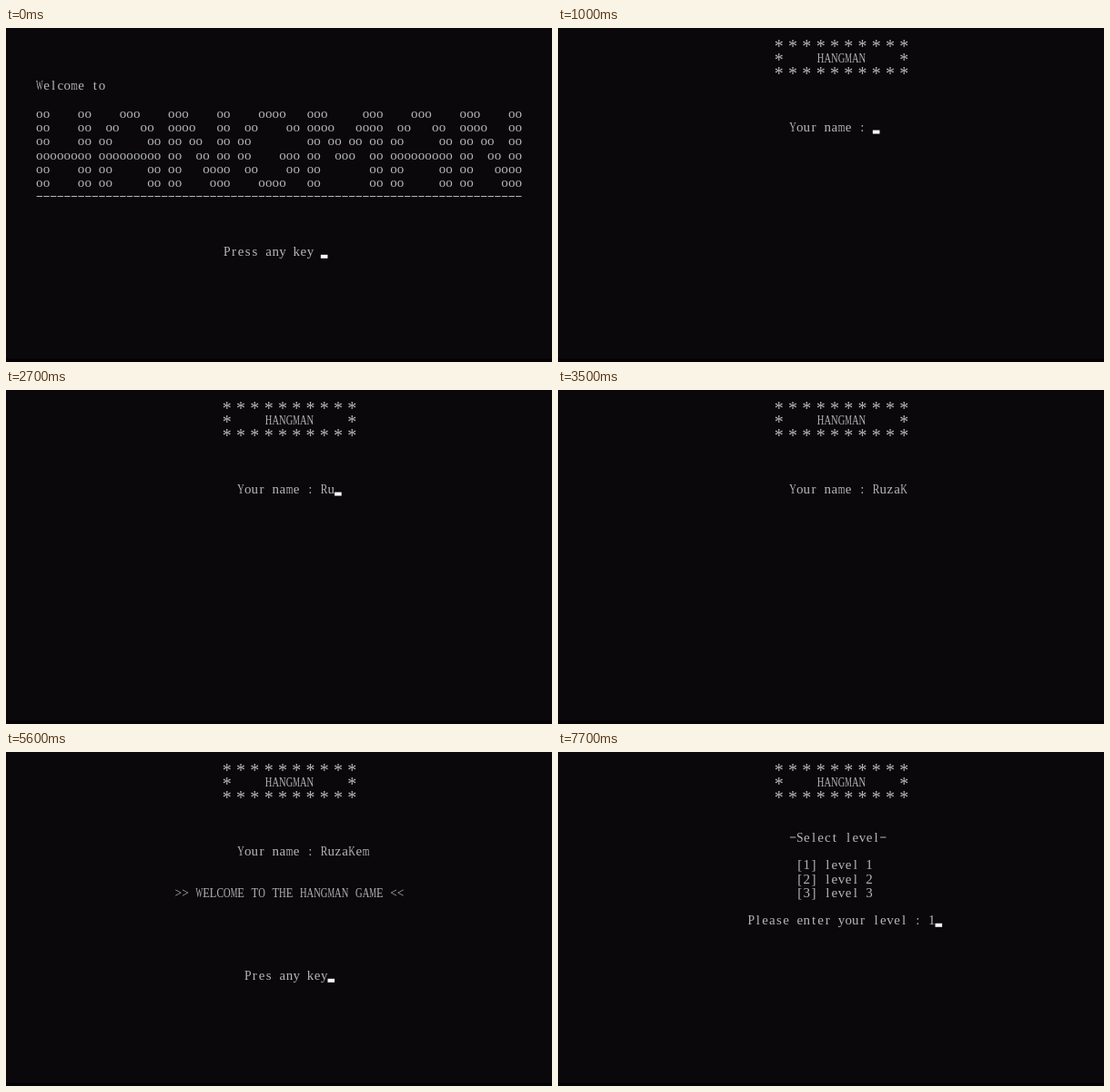
Recreate the animation shown at these times as an HTML page with a canvas. Size 600 px wide and 368 px high, loop 8000 ms.

```html
<!DOCTYPE html>
<html lang="en">
<head>
<meta charset="utf-8">
<title>Hangman in a console</title>
<style>
  html, body { margin: 0; width: 100%; height: 100%; overflow: hidden; background: #000; }
  canvas { display: block; }
</style>
</head>
<body>
<canvas id="stage" width="600" height="368"></canvas>
<script>
const ctx = document.getElementById('stage').getContext('2d');
const LOOP = 8000;
const CELL = 7.63, LINE = 15.25;
const LEFT = 2.5, TOP = 7.4;
const FAMILY = '"Liberation Serif", serif';
const NAME = 'RuzaKem';

const GLYPHS = {
  H: ['oo    oo', 'oo    oo', 'oo    oo', 'oooooooo', 'oo    oo', 'oo    oo'],
  A: ['   ooo   ', ' oo   oo ', 'oo     oo', 'ooooooooo', 'oo     oo', 'oo     oo'],
  N: ['ooo    oo', 'oooo   oo', 'oo oo  oo', 'oo  oo oo', 'oo   oooo', 'oo    ooo'],
  G: ['   oooo  ', ' oo    oo', 'oo       ', 'oo    ooo', ' oo    oo', '   oooo  '],
  M: ['ooo     ooo', 'oooo   oooo', 'oo oo oo oo', 'oo  ooo  oo', 'oo       oo', 'oo       oo']
};

// Every character is centred in its own console cell.
function print(col, row, text) {
  const y = TOP + row * LINE;
  ctx.fillStyle = '#b6b6b6';
  [...text].forEach((ch, i) => {
    const x = LEFT + (col + i + 0.5) * CELL;
    if (ch === '-') {
      ctx.fillRect(x - 3.2, y - 5.4, 6.4, 1);
    } else if (ch === '*') {
      ctx.font = '20px ' + FAMILY;
      ctx.fillText(ch, x, y + 4);
    } else {
      ctx.font = '15px ' + FAMILY;
      ctx.fillText(ch, x, y, CELL);
    }
  });
  return [col + text.length, row];
}

function cursor([col, row]) {
  ctx.fillStyle = '#f6f6f6';
  ctx.fillRect(LEFT + col * CELL, TOP + row * LINE - 1.6, CELL, 4);
}

function header() {
  const stars = Array(10).fill('*').join(' ');
  print(31, 1, stars);
  print(31, 2, '*     HANGMAN     *');
  print(31, 3, stars);
}

// Each screen returns the cell that follows its last character.
function title() {
  print(4, 4, 'Welcome to');
  for (let r = 0; r < 6; r++) {
    print(4, 6 + r, [...'HANGMAN'].map(letter => GLYPHS[letter][r]).join(' '));
  }
  print(4, 12, '-'.repeat(70));
  return print(31, 16, 'Press any key ');
}

function askName(typed) {
  header();
  return print(33, 7, 'Your name : ' + NAME.slice(0, typed));
}

function welcome() {
  askName(NAME.length);
  print(24, 10, '>> WELCOME TO THE HANGMAN GAME <<');
  return print(34, 16, 'Pres any key');
}

function askLevel(typed) {
  header();
  print(33, 6, '-Select level-');
  for (let n = 1; n <= 3; n++) print(34, 7 + n, `[${n}] level ${n}`);
  return print(27, 12, 'Please enter your level : ' + '1'.slice(0, typed));
}

// start time, screen, cursor visible, characters typed
const STEPS = [
  [0, title, true], [300, title, false], [800, title, true],
  [1000, askName, true, 0], [1900, askName, false, 0],
  [2300, askName, false, 1], [2400, askName, true, 1],
  [2700, askName, true, 2], [2800, askName, false, 3],
  [2900, askName, true, 3], [3000, askName, false, 4],
  [3200, askName, true, 5], [3500, askName, false, 5],
  [3600, askName, true, 7], [4000, askName, false, 7],
  [4500, welcome, true], [5000, welcome, false], [5600, welcome, true],
  [6000, askLevel, true, 0], [6600, askLevel, false, 0],
  [7000, askLevel, true, 1], [7200, askLevel, false, 1], [7700, askLevel, true, 1]
];

function draw(time) {
  const [, screen, showCursor, typed] = STEPS.findLast(([start]) => start <= time);
  ctx.fillStyle = '#040204';
  ctx.fillRect(0, 0, 600, 368);
  ctx.fillStyle = '#0a080b';
  ctx.fillRect(0, 0, 600, 364);
  ctx.textAlign = 'center';
  const end = screen(typed);
  if (showCursor) cursor(end);
}

const begin = performance.now();
function frame() {
  draw((performance.now() - begin) % LOOP);
  requestAnimationFrame(frame);
}
frame();
</script>
</body>
</html>
```
